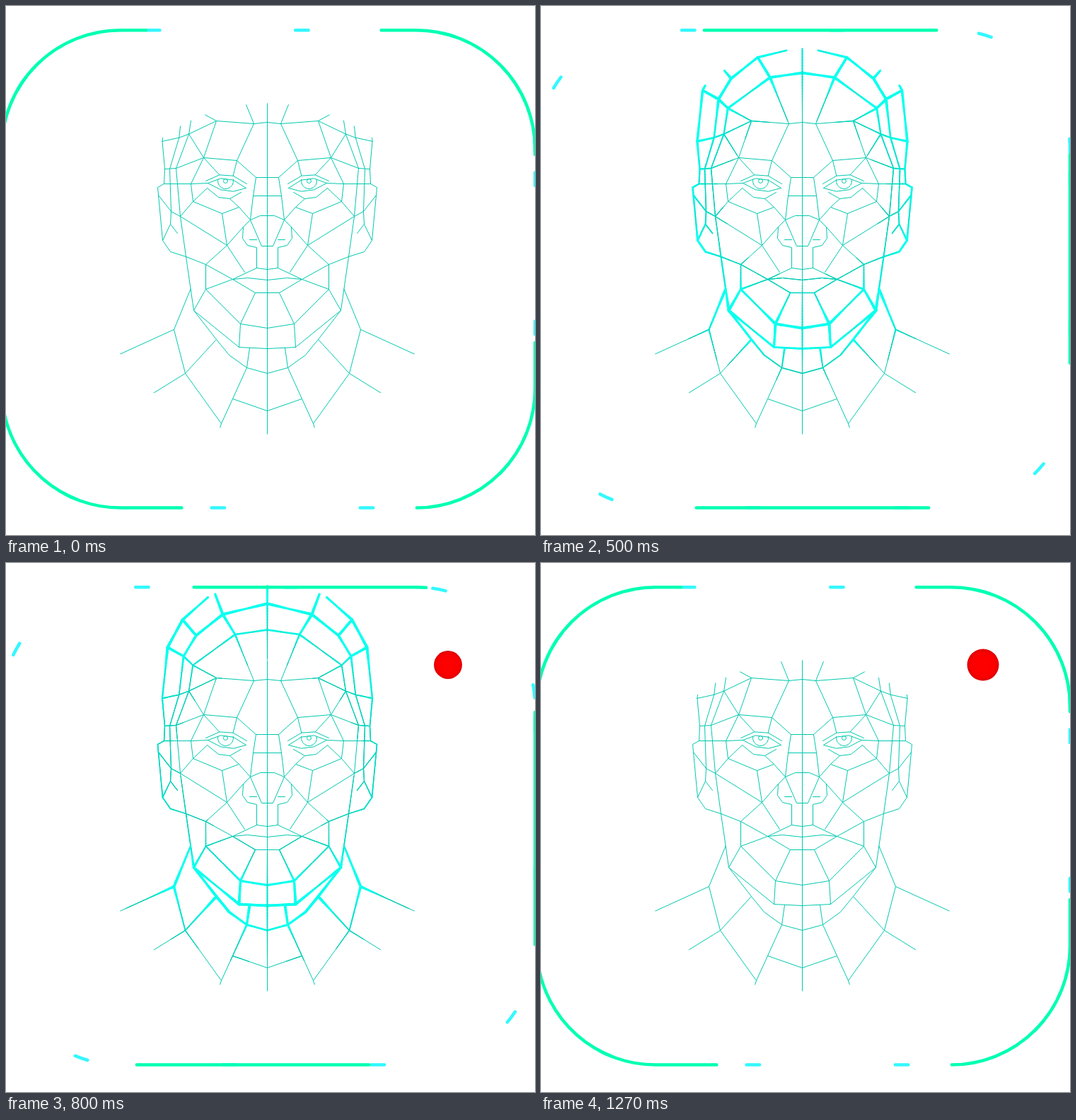
An HTML page with a canvas that plays this animation: 748x748 px, repeating every 1.41 s.

```html
<!DOCTYPE html>
<html lang="en">
<head>
<meta charset="utf-8">
<title>Face scan</title>
<style>
  html, body { margin: 0; width: 100%; height: 100%; overflow: hidden; background: #fff; }
  canvas { display: block; width: 748px; height: 748px; }
</style>
</head>
<body>
<canvas id="stage" width="748" height="748"></canvas>
<script>
const ctx = document.getElementById('stage').getContext('2d');
const LOOP = 1410, AXIS = 369, TAU = Math.PI * 2;
const clamp = v => Math.min(1, Math.max(0, v));
const mix = ([ax, ay], [bx, by], k) => [ax + (bx - ax) * k, ay + (by - ay) * k];
const gap = ([ax, ay], [bx, by]) => Math.hypot(ax - bx, ay - by);

// Landmarks of the left half; the right half is its mirror image.
const face = {
  foreIn: [350, 166], foreOut: [297, 162], browOut: [279, 214], browIn: [326, 218],
  temple: [240, 229], earRoot: [224, 230], orbit: [261, 251], orbitLow: [264, 276],
  under: [305, 293], underIn: [329, 284],
  bridge: [353, 242], noseMid: [349, 268], wing: [345, 302], tip: [359, 296],
  noseLow: [361, 339], alar: [335, 312], alarLow: [334, 328], nostril: [341, 338],
  septum: [354, 341], philtrum: [354, 370],
  cheek: [312, 338], cheekLow: [337, 376], cheekSide: [246, 297],
  jawTop: [282, 365], jawBack: [254, 354], jaw: [265, 430],
  mouth: [320, 386], lipTop: [341, 384], lip: [352, 405], mouthSide: [282, 400],
  chin: [331, 449], chinLow: [329, 482],
  earTop: [223, 251], earTip: [214, 256], earBack: [215, 267], lobe: [221, 331],
  lobeLow: [232, 347], earIn: [233, 290], earLow: [232, 308], earEnd: [242, 321],
  nape: [237, 457], shoulder: [147, 498], collar: [253, 519], collarEnd: [190, 558],
  throat: [297, 471], throatLow: [315, 493], throatIn: [340, 511], throatTop: [344, 483],
  rib: [320, 555], chest: [304, 590], chestEnd: [293, 624]
};
face.napeTop = mix(face.jawBack, face.jaw, 0.6);

// "name|dy" is the point on the axis level with a landmark, dy lower.
const chains = `
  foreIn|-2 foreIn foreOut browOut browIn foreIn
  browOut temple earRoot earTop earTip earBack lobe lobeLow jawBack
  browOut orbit earTop
  browIn bridge bridge|0
  bridge noseMid noseMid|0
  noseMid wing underIn under orbitLow orbit
  tip|0 tip wing noseLow noseLow|0
  wing alar alarLow nostril septum philtrum
  under cheek cheekLow
  alar cheek jawTop
  orbitLow cheekSide cheek
  temple cheekSide jawBack jaw chinLow chinLow|2
  jawBack jawTop mouth philtrum philtrum|2
  lipTop|3 lipTop mouth lip lip|0
  jawTop mouthSide mouth
  jaw mouthSide chin chin|6
  lip chin chinLow
  earBack earIn earLow earEnd
  earIn cheekSide
  earLow lobe
  napeTop nape collar chest chestEnd
  nape shoulder
  collarEnd collar throat
  jaw throat throatLow throatIn throatIn|8
  throatTop throatIn rib chest
  rib rib|17`;
const locate = token => {
  const [name, dy] = token.split('|');
  return dy === undefined ? face[name] : [AXIS, face[name][1] + Number(dy)];
};
const half = chains.trim().split('\n').map(row => row.trim().split(' ').map(locate));

// The skull is three nested arcs joined by spokes.
const dome = ([rx, ry], degrees) => {
  const a = degrees * TAU / 360;
  return [AXIS - rx * Math.sin(a), 170 - ry * Math.cos(a)];
};
const [outer, middle, inner] = [[150, 150], [126, 113], [112, 76]];
const spokes = [0, 30, 53, 70, 98];
half.push(...[outer, middle].map(row => spokes.map(a => dome(row, a))));
half.push([0, 24, 70, 98].map(a => dome(inner, a)));
half.push(
  [dome(outer, 30), dome(middle, 30), dome(inner, 24), face.foreIn],
  [dome(outer, 53), dome(middle, 53)],
  [dome(outer, 70), dome(middle, 70), dome(inner, 70), face.foreOut],
  [dome(outer, 98), dome(middle, 98), dome(inner, 98), face.foreOut],
  [dome(inner, 98), face.browOut],
  [dome(inner, 98), face.temple],
  [dome(middle, 98), [231, 230], face.earIn],
  [dome(outer, 98), face.earRoot]
);

// Lids, brow ridge and eye bag: a chord bent by h at its thirds.
const bend = (a, b, h) => {
  const [p, q] = [mix(a, b, 1 / 3), mix(a, b, 2 / 3)];
  return [a, [p[0], p[1] + h], [q[0], q[1] + h], b];
};
const eyeOut = [285, 250], eyeIn = [339, 257];
const ridge = bend([282, 247], [340, 251], -10);
const bag = bend([284, 257], [332, 263], 11);
half.push(ridge, bag, bend(eyeOut, eyeIn, -9), bend(eyeOut, eyeIn, 7),
  [face.orbit, eyeOut], [face.browOut, ridge[1]], [face.browIn, ridge[2]],
  [face.orbitLow, bag[0]], [face.underIn, bag[2]],
  [[344, 330], [354, 330]]);

const mirror = pts => pts.map(([x, y]) => [2 * AXIS - x, y]);
const lines = [...half, ...half.map(mirror), [[AXIS, 20], [AXIS, 626]]];

const mesh = new Path2D();
const pieces = [];
for (const pts of lines) {
  pts.forEach((p, i) => i ? mesh.lineTo(...p) : mesh.moveTo(...p));
  for (let i = 1; i < pts.length; i++) {
    const a = pts[i - 1], b = pts[i], length = gap(a, b);
    const n = Math.ceil(length / 4);
    for (let k = 0; k < n; k++) {
      const u = (k + 0.5) / n;
      pieces.push({
        from: mix(a, b, k / n), to: mix(a, b, (k + 1) / n), mid: mix(a, b, u),
        end: Math.min(u, 1 - u) * length
      });
    }
  }
}
for (const x of [310, 2 * AXIS - 310]) {
  mesh.moveTo(x + 10.8, 245);
  mesh.arc(x, 247, 11, -0.2, Math.PI + 0.2);
  mesh.moveTo(x + 3, 247);
  mesh.arc(x, 247, 3, 0, TAU);
}

// Open rounded rectangle; dashes run clockwise from its start on the right edge.
const box = { left: -6, right: 748, top: 34.2, bottom: 709.6, r: 168 };
const frame = new Path2D();
frame.moveTo(box.right, 210);
for (let i = 0; i < 4; i++) {
  const x = i % 3 ? box.left + box.r : box.right - box.r;
  const y = i < 2 ? box.bottom - box.r : box.top + box.r;
  frame.arc(x, y, box.r, i * TAU / 4, (i + 1) * TAU / 4);
}
frame.lineTo(box.right, 210);

const ease = (t, from, to) => (1 - Math.cos(Math.PI * clamp((t - from) / (to - from)))) / 2;
const thereAndBack = (t, from, to) => ease(t, from, to) - ease(t, 960, 1270);

function drawFrame(t) {
  const dash = (color, on, period, phase) => {
    ctx.strokeStyle = color;
    ctx.setLineDash([on, period - on]);
    ctx.lineDashOffset = -phase;
    ctx.stroke(frame);
  };
  ctx.lineWidth = 4.5;
  ctx.lineCap = 'round';
  dash('#33f8ff', 18.5, 210.2, 25.5 + 252 * thereAndBack(t, 500, 941));
  dash('#00ffb2', 328.5, 661, 266 + 396 * thereAndBack(t, 231, 565));
  ctx.setLineDash([]);
}

const waves = [{ start: 200, span: 200 }, { start: 544, span: 157.5 }];
const tint = k => `rgb(${12 * k | 0},${200 + 55 * k | 0},${174 + 64 * k | 0})`;
const scope = { x: AXIS, y: 371, rx: 243, ry: 234 };
const inScope = ([x, y]) => Math.hypot((x - scope.x) / scope.rx, (y - scope.y) / scope.ry) < 1;

// An expanding ring thickens the mesh, most near its nodes, and uncovers its outskirts.
function drawWave(r) {
  const fade = clamp((330 - r) / 100);
  for (const { from, to, mid, end } of pieces) {
    const d = gap(mid, [AXIS, 270]);
    const visible = inScope(mid);
    const uncovered = d > 1.4 * r - 200 && d < 1.12 * r;
    const ring = fade * Math.exp(-(((d / r - 1) / 0.16) ** 2) / 2);
    const k = ring * (0.35 + 0.65 * Math.exp(-((end / (0.17 * r)) ** 2)));
    if (visible ? k < 0.04 : !uncovered) continue;
    ctx.strokeStyle = tint(clamp(k * 1.6));
    ctx.lineWidth = 1 + 3 * k;
    ctx.beginPath();
    ctx.moveTo(...from);
    ctx.lineTo(...to);
    ctx.stroke();
  }
}

function drawFace(t) {
  ctx.save();
  ctx.translate(0.5, 0.5);
  ctx.save();
  ctx.beginPath();
  ctx.ellipse(scope.x, scope.y, scope.rx, scope.ry, 0, 0, TAU);
  ctx.clip();
  ctx.lineWidth = 1;
  ctx.strokeStyle = tint(0);
  ctx.stroke(mesh);
  ctx.restore();
  ctx.lineCap = 'round';
  for (const { start, span } of waves) {
    const r = 97 * Math.max(0, (t - start) / span) ** 1.6;
    if (r > 2 && r < 620) drawWave(r);
  }
  ctx.restore();
}

function drawBall(t) {
  const rise = (from, to) => Math.sin(clamp((t - from) / (to - from)) * Math.PI / 2);
  const size = rise(70, 235) - rise(250, 390)
    + rise(690, 850) - rise(870, 1010) + rise(1110, 1270);
  const r = 22.5 * size;
  if (r < 0.5) return;
  const shade = ctx.createRadialGradient(625, 144, 0, 625, 144, r);
  shade.addColorStop(0, '#ff0000');
  shade.addColorStop(0.75, '#fb0000');
  shade.addColorStop(1, '#dc0000');
  ctx.fillStyle = shade;
  ctx.beginPath();
  ctx.arc(625, 144, r, 0, TAU);
  ctx.fill();
}

function render() {
  const t = performance.now() % LOOP;
  ctx.fillStyle = '#fff';
  ctx.fillRect(0, 0, 748, 748);
  drawFace(t);
  drawFrame(t);
  drawBall(t);
  requestAnimationFrame(render);
}
render();
</script>
</body>
</html>
```
